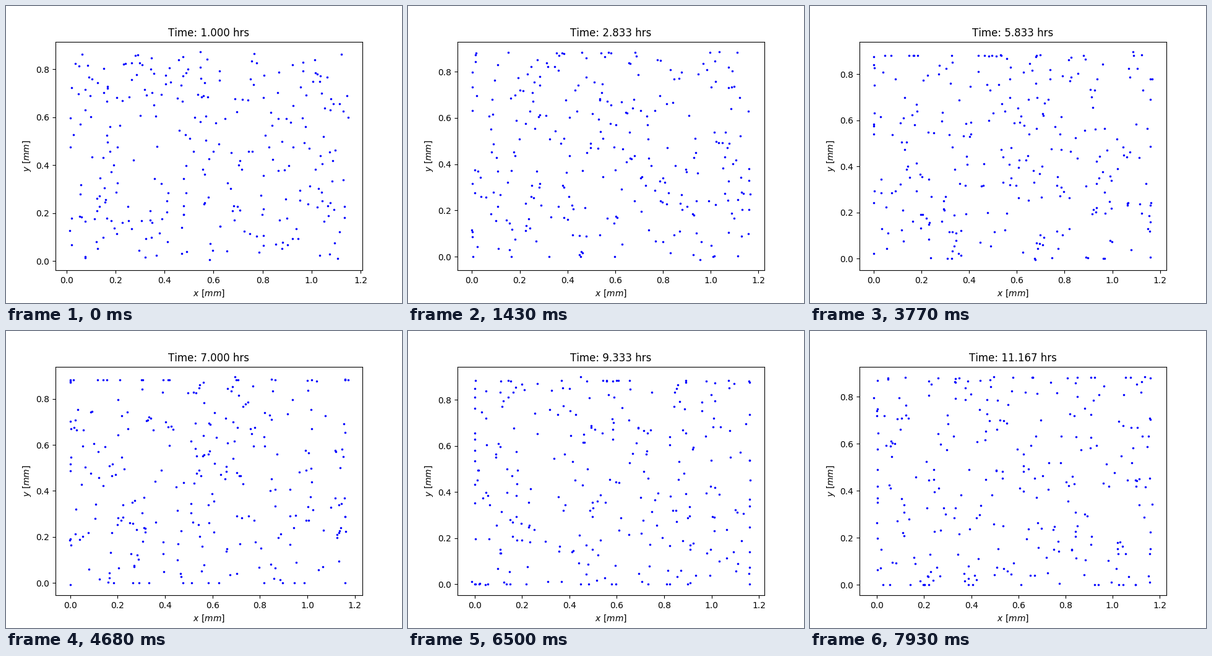
A matplotlib script for the animation above (8000 ms loop, 640x480 px).

```python
import numpy as np
import matplotlib.pyplot as plt
from matplotlib.animation import FuncAnimation

STEPS, LOOP = 62, 8000
CELLS = 276
SPEED, TURN = 0.023, 0.8
OVERSHOOT = 0.017
BOX = np.array([1.161, 0.884])
START_LO = np.array([0.0115, 0.0046])
START_HI = np.array([1.1507, 0.8713])

plt.rcParams["text.kerning_factor"] = 6
rng = np.random.default_rng(12)


def push_out(pos):
    """Let the outermost cell on each side slip a little past its wall."""
    out = pos.copy()
    for k in range(2):
        below, above = OVERSHOOT * rng.random(2) ** 2
        out[pos[:, k].argmin(), k] = -below
        out[pos[:, k].argmax(), k] = BOX[k] + above
    return out


def simulate():
    """Cells wander with slowly turning headings and stick to the walls."""
    pos = rng.uniform(START_LO, START_HI, (CELLS, 2))
    for k in range(2):
        pos[pos[:, k].argmin(), k] = START_LO[k]
        pos[pos[:, k].argmax(), k] = START_HI[k]
    angle = rng.uniform(0, 2 * np.pi, CELLS)
    states = [pos]
    for _ in range(1, STEPS):
        angle += rng.normal(0, TURN, CELLS)
        pos = pos + SPEED * np.column_stack([np.cos(angle), np.sin(angle)])
        pos = np.clip(pos, 0, BOX)
        at_wall = (pos == 0) | (pos == BOX)
        states.append(push_out(pos - at_wall * np.sign(pos - BOX / 2)
                               * np.abs(rng.normal(0, 0.0015, pos.shape))))
    return states


states = simulate()

fig, ax = plt.subplots(figsize=(6.4, 4.8), dpi=100)
dots, = ax.plot([], [], "b.", markersize=3)
title = ax.set_title("")
ax.set_xlabel(r"$x\ [mm]$")
ax.set_ylabel(r"$y\ [mm]$")


def draw(step):
    dots.set_data(*states[step].T)
    ax.relim()
    ax.autoscale_view()
    title.set_text(f"Time: {1 + step / 6:.3f} hrs")
    return dots, title


anim = FuncAnimation(fig, draw, frames=STEPS, interval=LOOP / STEPS,
                     repeat=True, repeat_delay=0, blit=False)
plt.show()
```
